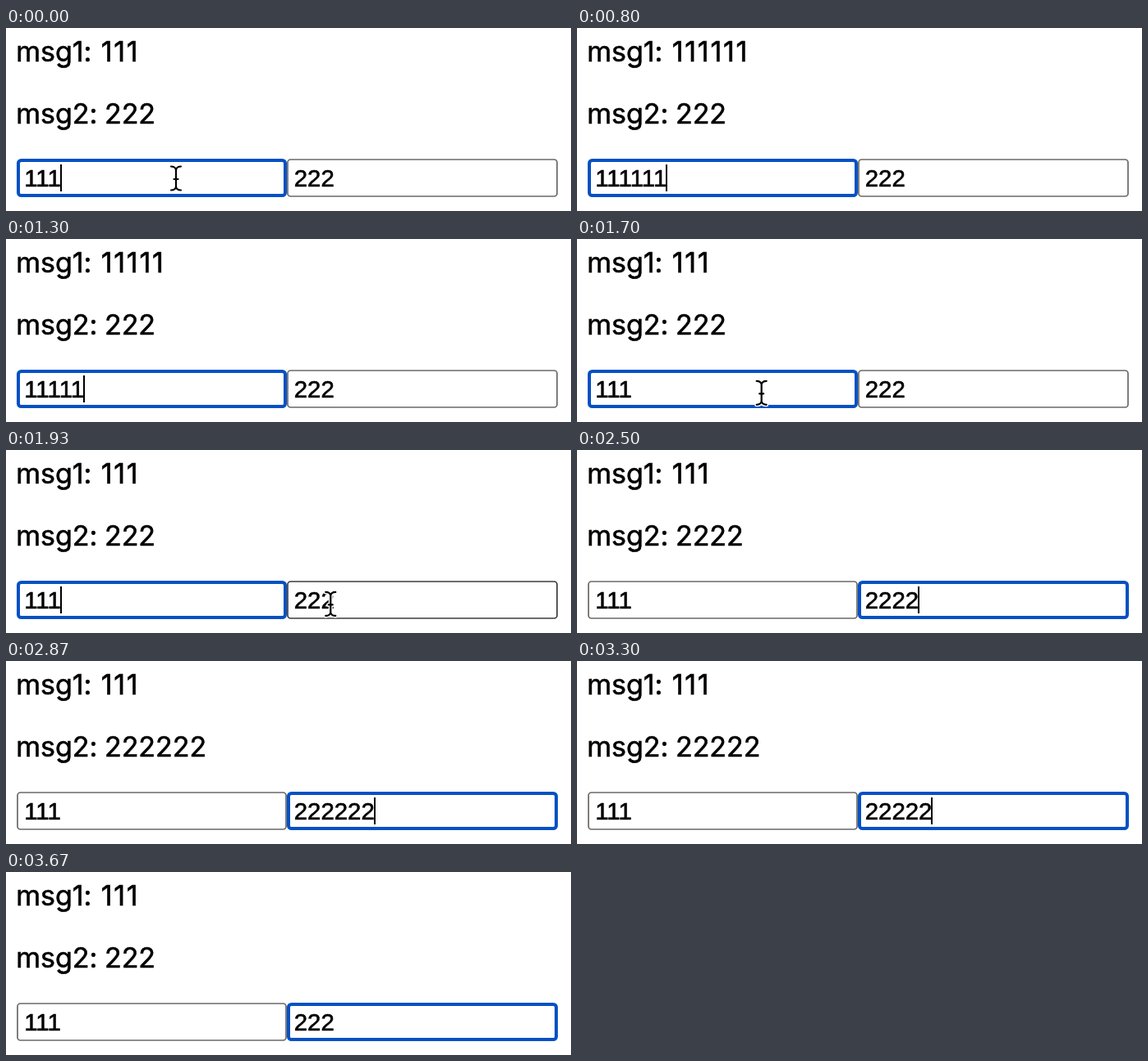
An HTML page for the animation above (3710 ms loop, 688 px wide and 224 px high).

```html
<!DOCTYPE html>
<html lang="en">
<head>
<meta charset="utf-8">
<style>
  html, body { margin: 0; width: 100%; height: 100%; overflow: hidden; background: #fff; }
  svg { display: block; width: 688px; height: 224px; }
  text { stroke: #000; stroke-width: 0.6px; }
  .message { font: 34px Inter, sans-serif; font-feature-settings: "calt" 0; }
  .value { font: 29.4px "Liberation Sans", Arial, sans-serif; font-kerning: normal; }
  #message1 { letter-spacing: 1.75px; }
  .beam { fill: none; stroke-linecap: round; }
</style>
</head>
<body>
<svg viewBox="0 0 688 224">
  <g class="message">
    <text x="12.2" y="41">msg1:</text><text id="message1" x="115.7" y="41"></text>
    <text x="12.2" y="117">msg2:</text><text id="message2" x="119.9" y="117"></text>
  </g>
  <g id="boxes">
    <rect id="box1"/>
    <rect id="box2"/>
  </g>
  <g class="value">
    <text id="value1" x="22.2" y="194"></text>
    <text id="value2" x="350.7" y="194"></text>
  </g>
  <rect id="caret" y="167" width="2" height="33"/>
  <g id="mouse" class="beam">
    <path id="halo" stroke="#fff" stroke-width="5"/>
    <path id="beam" stroke="#000" stroke-width="2.2"/>
  </g>
</svg>
<script>
const LOOP = 3710;
const FOCUS_SWITCH = 2200;
const $ = id => document.getElementById(id);

// [time, number of characters]
const counts1 = [[0, 3], [370, 4], [630, 5], [800, 6], [1300, 5], [1470, 4], [1633, 3]];
const counts2 = [[0, 3], [2500, 4], [2670, 5], [2870, 6], [3300, 5], [3470, 4], [3630, 3]];
const caretGaps = [[1665, 1800], [3370, 3470], [3665, LOOP]];

const countAt = (steps, t) => steps.filter(([start]) => t >= start).pop()[1];
const smooth = u => u * u * (3 - 2 * u);
const clamp = u => Math.max(0, Math.min(1, u));

const beamPath = "M-6 -14.5Q-1 -14.5 0 -10.5Q1 -14.5 6 -14.5M0 -10.5V10.5" +
  "M-6 14.5Q-1 14.5 0 10.5Q1 14.5 6 14.5M-2.5 1H2.5";
$("halo").setAttribute("d", beamPath);
$("beam").setAttribute("d", beamPath);

function set(id, attributes) {
  for (const name in attributes) $(id).setAttribute(name, attributes[name]);
}

function drawBox(id, left, right, focused, hovered) {
  const inset = focused ? 2 : 1;
  set(id, {
    x: left + inset, y: 160 + inset,
    width: right - left - 2 * inset, height: 47 - 2 * inset,
    rx: 3.5, fill: "#fff",
    stroke: focused ? "#0551c3" : hovered ? "#3c3c3c" : "#696969",
    "stroke-width": focused ? 4 : 1.7
  });
  if (focused && $("boxes").lastElementChild !== $(id)) $("boxes").append($(id));
}

// The pointer moves in steps of a thirtieth of a second.
function mouseAt(t) {
  const tick = Math.floor(t * 0.03 + 0.2) / 0.03;
  const x = 207 + 224 * smooth(clamp((tick - 1630) / 406));
  const y = 184 + 4.3 * clamp((tick - 1640) / 60) + 3.7 * clamp((tick - 1930) / 130);
  return { x, y, visible: t < 370 || (t >= 1665 && t < 2500) };
}

function render(t) {
  const text1 = "1".repeat(countAt(counts1, t));
  const text2 = "2".repeat(countAt(counts2, t));
  $("message1").textContent = $("value1").textContent = text1;
  $("message2").textContent = $("value2").textContent = text2;

  const mouse = mouseAt(t);
  const second = t >= FOCUS_SWITCH;
  drawBox("box1", 13, 342, !second, false);
  drawBox("box2", 342, 672, second, mouse.visible && mouse.x > 342);

  const field = $(second ? "value2" : "value1");
  const caretX = +field.getAttribute("x") + field.getComputedTextLength() - 1.2;
  const caretOn = !caretGaps.some(([from, to]) => t >= from && t < to);
  set("caret", { x: Math.round(caretX), visibility: caretOn ? "visible" : "hidden" });
  set("mouse", {
    transform: `translate(${mouse.x} ${mouse.y})`,
    visibility: mouse.visible ? "visible" : "hidden"
  });
}

const start = performance.now();
function frame() {
  render((performance.now() - start) % LOOP);
  requestAnimationFrame(frame);
}
frame();
</script>
</body>
</html>
```
